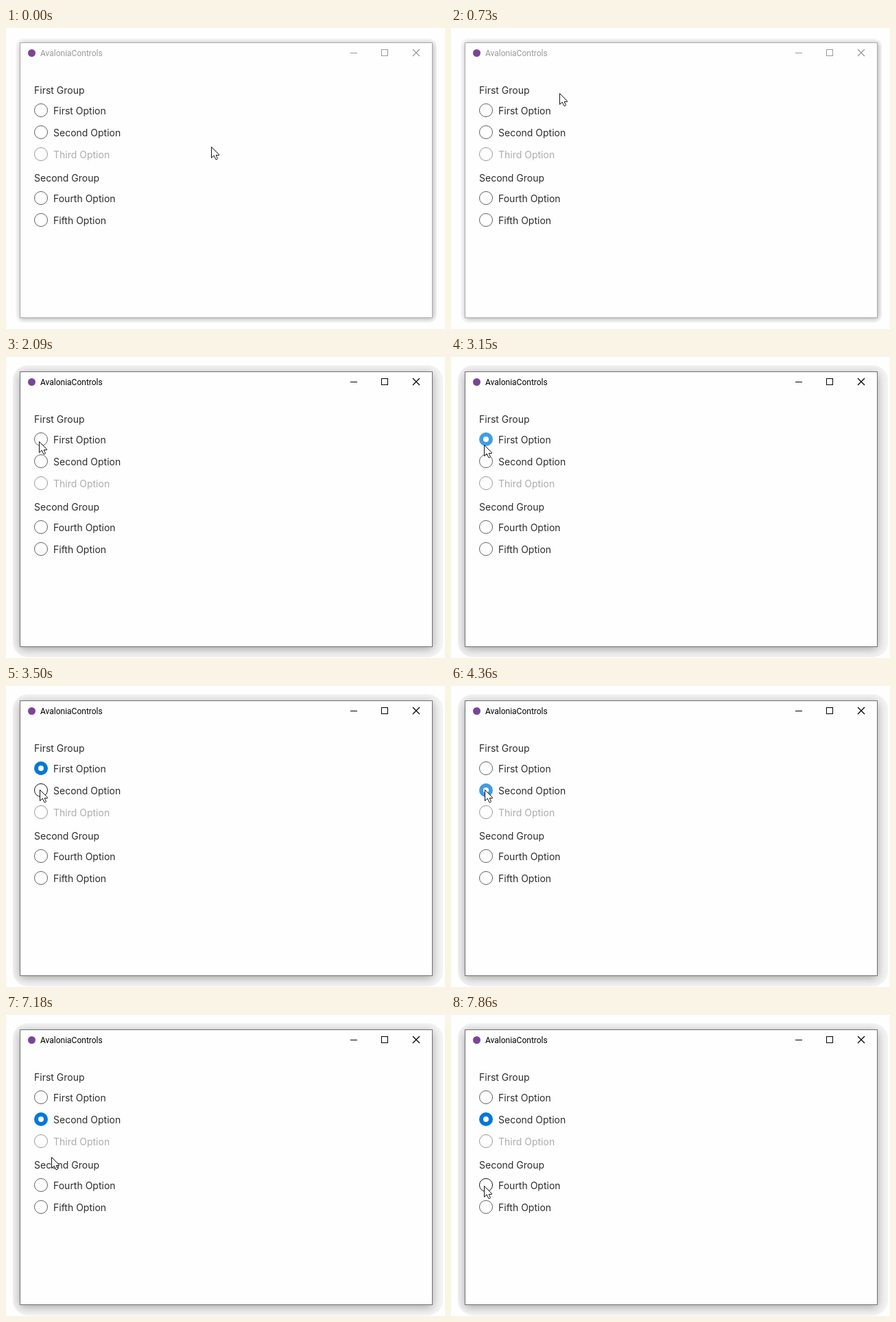
An HTML page with a canvas for the animation above (8 s loop, 640 by 439 pixels).

```html
<!DOCTYPE html>
<html lang="en">
<head>
<meta charset="utf-8">
<title>Radio buttons</title>
<style>
  html, body { margin: 0; width: 100%; height: 100%; overflow: hidden; background: #fefefe; }
  canvas { display: block; }
</style>
</head>
<body>
<canvas id="stage" width="640" height="439"></canvas>
<script>
const ctx = document.getElementById('stage').getContext('2d');
const LOOP = 8000;
const PAPER = '#fefefe';
const INK = '#2c2c2c';
const FAINT = '#acacac';
const ROW = 32;
const LABEL_FONT = '14px Inter, sans-serif';

const groups = [
  { title: 'First Group', y: 96, options: ['First Option', 'Second Option', 'Third Option'] },
  { title: 'Second Group', y: 224, options: ['Fourth Option', 'Fifth Option'] }
];
const DISABLED = 'Third Option';

const clicks = [
  { down: 2090, up: 2220, option: 'First Option' },
  { down: 4250, up: 4360, option: 'Second Option' }
];

// The pointer travels from rest to rest in evenly timed steps.
const rest = { x: 299, y: 173 };
const moves = [
  { start: 560, end: 1310, steps: 14, x: 50, y: 123, bend: { x: 136, y: 41 }, power: 2 },
  { start: 1380, end: 1380, steps: 1, x: 48, y: 123 },
  { start: 3150, end: 3500, steps: 7, x: 49, y: 151 },
  { start: 5240, end: 5540, steps: 5, x: 74, y: 187 },
  { start: 7120, end: 7520, steps: 8, x: 48, y: 250 },
  { start: 7860, end: 7860, steps: 1, x: 48, y: 249 }
];

function pointerAt(time) {
  const index = moves.findLastIndex(m => m.start <= time);
  if (index < 0) return rest;
  const to = moves[index];
  const from = moves[index - 1] || rest;
  const { start, end, steps, power = 1.3 } = to;
  const interval = (end - start) / (steps - 1) || 1;
  const step = Math.min(steps, Math.floor((time - start) / interval + 0.1) + 1);
  const s = 1 - (1 - step / steps) ** power;
  const curve = axis => {
    const middle = to.bend ? to.bend[axis] : (from[axis] + to[axis]) / 2;
    return Math.round((1 - s) ** 2 * from[axis] + 2 * s * (1 - s) * middle + s * s * to[axis]);
  };
  return { x: curve('x'), y: curve('y') };
}

function text(label, x, y, font, color) {
  ctx.font = font;
  ctx.fillStyle = color;
  ctx.fillText(label, x, y);
}

function circle(x, y, r) {
  ctx.beginPath();
  ctx.arc(x, y, r, 0, Math.PI * 2);
}

function disc(x, y, r, color) {
  circle(x, y, r);
  ctx.fillStyle = color;
  ctx.fill();
}

function line(x1, y1, x2, y2) {
  ctx.beginPath();
  ctx.moveTo(x1, y1);
  ctx.lineTo(x2, y2);
  ctx.stroke();
}

function drawShadow(active) {
  ctx.save();
  ctx.beginPath();
  if (active) ctx.roundRect(10, 12, 627, 426, 22);
  else ctx.roundRect(14, 15, 614, 415, 12);
  ctx.clip();
  ctx.fillStyle = active ? '#f4f4f4' : '#fafafa';
  ctx.fillRect(0, 0, 640, 439);
  ctx.shadowColor = active ? 'rgba(0,0,0,.34)' : 'rgba(0,0,0,.32)';
  ctx.shadowBlur = active ? 13 : 8;
  ctx.shadowOffsetX = active ? 0 : 1;
  ctx.shadowOffsetY = active ? 3 : 1;
  ctx.fillStyle = PAPER;
  ctx.fillRect(20, 21, 602, 402);
  ctx.restore();
}

function drawWindow(active) {
  drawShadow(active);
  ctx.fillStyle = PAPER;
  ctx.fillRect(20, 21, 602, 402);
  ctx.strokeStyle = active ? '#707070' : '#aaa';
  ctx.strokeRect(20.5, 21.5, 601, 401);

  disc(37.5, 36.5, 5.5, '#7a4599');
  const ink = active ? '#000' : '#999';
  text('AvaloniaControls', 50, 41, '12px Roboto, sans-serif', ink);

  ctx.strokeStyle = ink;
  line(502, 36.5, 512, 36.5);
  ctx.strokeRect(547.5, 31.5, 9, 9);
  ctx.lineWidth = 1.2;
  line(593, 31, 603, 41);
  line(603, 31, 593, 41);
  ctx.lineWidth = 1;
}

function drawOption(label, y, { checked, hovered, pressed }) {
  const disabled = label === DISABLED;
  if (checked) {
    disc(51, y, 10, hovered ? '#429ce3' : '#0078d7');
    disc(51, y, 4, '#fff');
  } else {
    circle(51, y, 9.5);
    ctx.strokeStyle = disabled ? '#989898' : hovered && !pressed ? '#111' : '#606060';
    ctx.stroke();
  }
  text(label, 69, y + 6, LABEL_FONT, disabled ? FAINT : INK);
}

function drawPointer({ x, y }) {
  const outline = [[0, 0], [0, 16], [3.7, 12.5], [6.3, 18], [8.3, 18], [9, 17], [6.7, 12], [11, 12], [11, 11]];
  ctx.save();
  ctx.translate(x + 0.5, y + 0.5);
  ctx.beginPath();
  outline.forEach(p => ctx.lineTo(...p));
  ctx.closePath();
  ctx.fillStyle = '#fff';
  ctx.fill();
  ctx.strokeStyle = '#101018';
  ctx.stroke();
  ctx.restore();
}

function draw(time) {
  const pointer = pointerAt(time);
  const chosen = clicks.findLast(c => c.up <= time);
  const held = clicks.find(c => c.down <= time && time < c.up);

  ctx.fillStyle = PAPER;
  ctx.fillRect(0, 0, 640, 439);
  drawWindow(time >= clicks[0].down);
  for (const group of groups) {
    text(group.title, 41, group.y, LABEL_FONT, INK);
    group.options.forEach((label, i) => {
      const y = group.y + 24 + i * ROW;
      drawOption(label, y, {
        checked: chosen?.option === label,
        hovered: pointer.x >= 41 && pointer.x < 168 && Math.abs(pointer.y - y) < ROW / 2,
        pressed: held?.option === label
      });
    });
  }
  drawPointer(pointer);
}

function frame() {
  draw(performance.now() % LOOP);
  requestAnimationFrame(frame);
}
frame();
</script>
</body>
</html>
```
